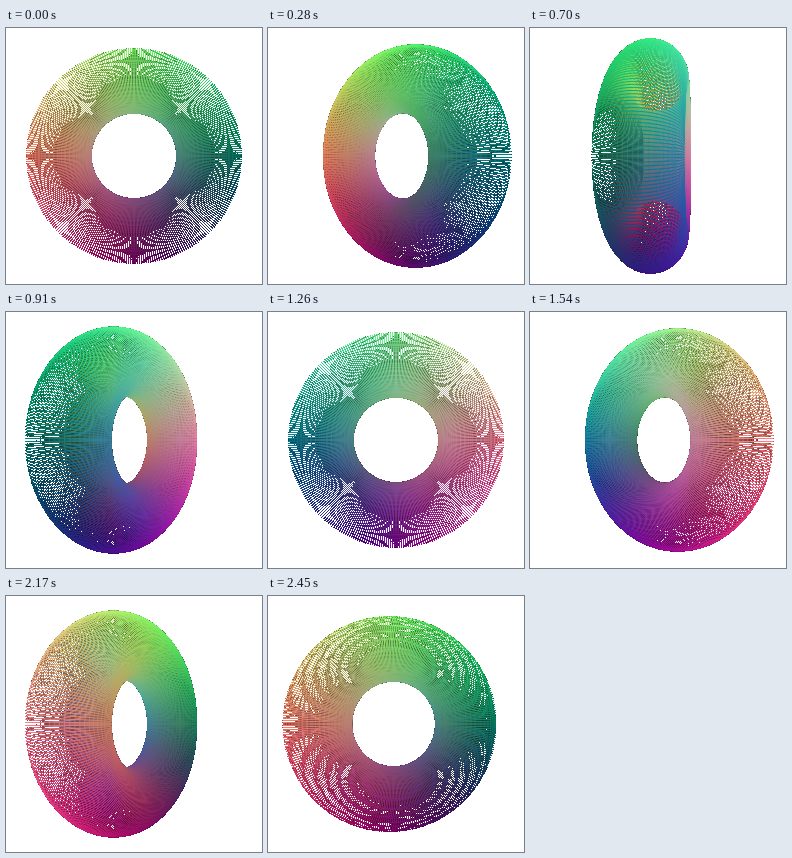
An HTML page with a canvas for the animation above (2.52 s loop, 256 by 256 pixels).

```html
<!DOCTYPE html>
<html lang="en">
<head>
<meta charset="utf-8">
<title>Turning wire torus</title>
<style>
  html, body { margin: 0; width: 100%; height: 100%; overflow: hidden; background: #fff; }
  canvas { display: block; width: 256px; height: 256px; }
</style>
</head>
<body>
<canvas id="stage" width="256" height="256"></canvas>
<script>
const SIZE = 256, MID = SIZE / 2, TAU = Math.PI * 2;
const STEP_MS = 70, STEPS = 36;
const RING = 73.6, TUBE = 30.3, REACH = RING + TUBE;
const LOOPS = 300, PARTS = 44;
const CAMERA = MID / Math.tan(Math.PI / 6);

const ctx = document.getElementById('stage').getContext('2d', { willReadFrequently: true });
ctx.lineCap = 'square';
ctx.lineWidth = 1;

function torusPoint(loop, part) {
  const around = TAU * (loop + 0.5) / LOOPS, turn = TAU * part / PARTS;
  const radius = RING + TUBE * Math.cos(turn);
  return { x: radius * Math.cos(around), y: radius * Math.sin(around), z: TUBE * Math.sin(turn) };
}

// Position inside the bounding cube gives red, green and blue.
function colorAt({ x, y, z }) {
  const channel = v => Math.round(127.5 * (1 + v / REACH));
  return `rgb(${channel(-x)},${channel(y)},${channel(-z)})`;
}

const segments = [];
for (let loop = 0; loop < LOOPS; loop++) {
  for (let part = 0; part < PARTS; part++) {
    const from = torusPoint(loop, part), to = torusPoint(loop, part + 1);
    segments.push({ from, to, color: colorAt(torusPoint(loop, part + 0.5)), depth: 0 });
  }
}

// Half-covered pixels darken, fainter ones vanish.
function hardenEdges() {
  const image = ctx.getImageData(0, 0, SIZE, SIZE), px = image.data;
  for (let i = 0; i < px.length; i += 4) {
    const alpha = px[i + 3] / 255;
    for (let c = 0; c < 3; c++) px[i + c] *= alpha;
    px[i + 3] = alpha < 0.5 ? 0 : 255;
  }
  ctx.putImageData(image, 0, 0);
}

function draw(angle) {
  const cos = Math.cos(angle), sin = Math.sin(angle);
  const depth = p => p.x * sin + p.z * cos;
  const project = p => {
    const scale = CAMERA / (CAMERA - depth(p));
    return [MID + (p.x * cos - p.z * sin) * scale, MID - p.y * scale];
  };
  for (const s of segments) s.depth = depth(s.from) + depth(s.to);
  segments.sort((a, b) => a.depth - b.depth);

  ctx.clearRect(0, 0, SIZE, SIZE);
  for (const { from, to, color } of segments) {
    ctx.strokeStyle = color;
    ctx.beginPath();
    ctx.moveTo(...project(from));
    ctx.lineTo(...project(to));
    ctx.stroke();
  }
  hardenEdges();
}

let shown = -1;
function tick() {
  const step = Math.floor(performance.now() / STEP_MS) % STEPS;
  if (step !== shown) draw(TAU * step / STEPS);
  shown = step;
  requestAnimationFrame(tick);
}
tick();
</script>
</body>
</html>
```
